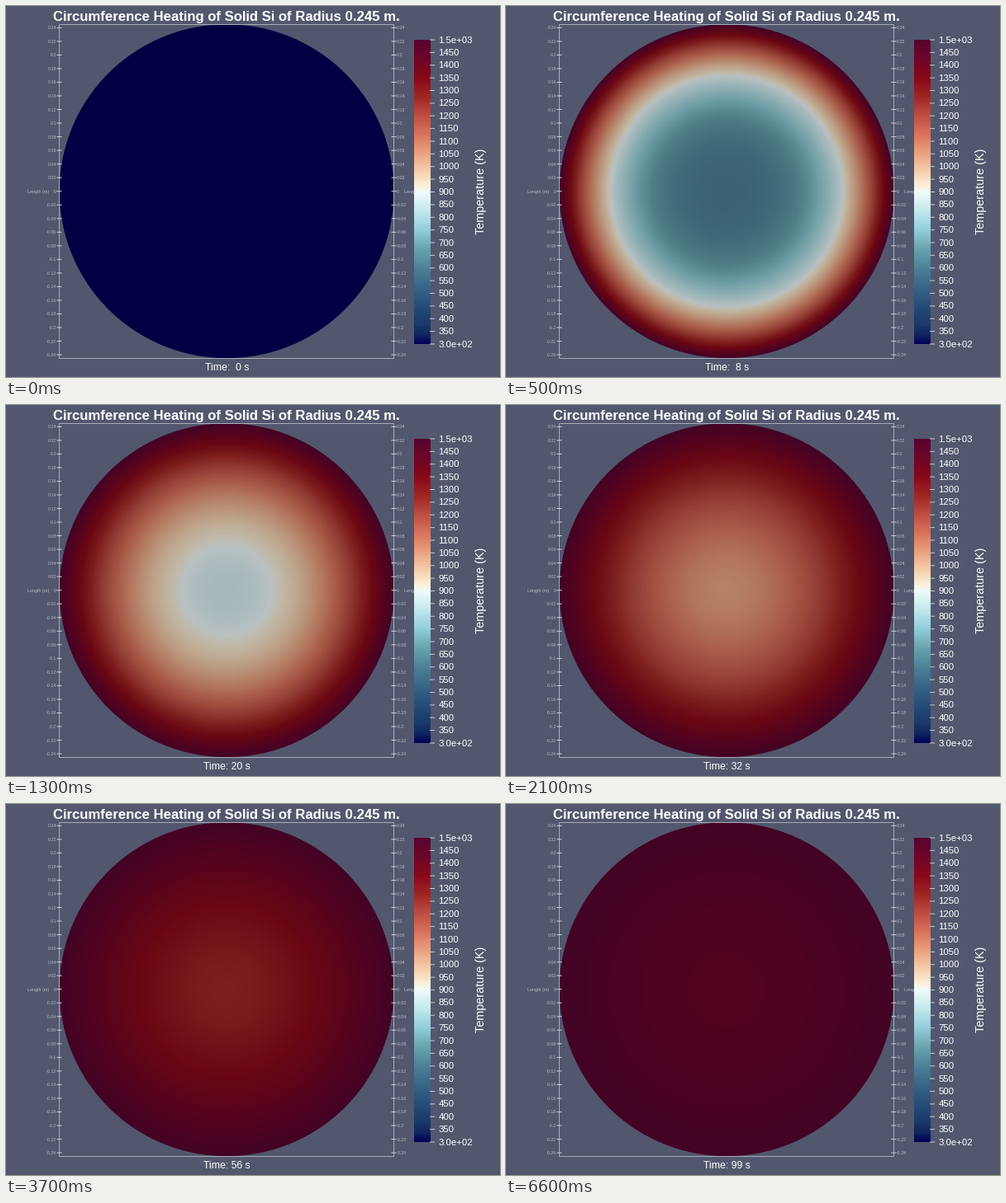
Animation of 598 by 450 pixels, one loop 6.7 s. Source, as a matplotlib script:

```python
import numpy as np
import matplotlib.pyplot as plt
from matplotlib.animation import FuncAnimation
from matplotlib.colors import LinearSegmentedColormap, to_rgb
from matplotlib.patches import Circle, Rectangle

W, H, DPI = 598, 450, 100
FRAMES, INTERVAL = 67, 100
STEP = 1.5                         # simulated seconds per frame
T_COLD, T_HOT = 300, 1500
CX, CY, R = 267.2, 224.7, 202.5    # disk, in pixels
SCALE = R / 0.245                  # pixels per metre
SHADE = 0.77                       # lighting on the disk surface

STOPS = [
    (0, "#000057"), (.03, "#11265f"), (.0625, "#1a3868"), (.125, "#264d78"),
    (.1875, "#386688"), (.25, "#4d8298"), (.3125, "#69a4ad"), (.375, "#92ced9"),
    (.4375, "#c2e8ee"), (.5, "#f0fafb"), (.52, "#fbf0da"), (.5625, "#f6d4b3"),
    (.625, "#eba482"), (.6875, "#db755d"), (.75, "#bf4f44"), (.8125, "#a12626"),
    (.875, "#890918"), (.9375, "#6f0428"), (1, "#560531"),
]


def heat_map(gain):
    stops = [(p, tuple(gain * c for c in to_rgb(h))) for p, h in STOPS]
    return LinearSegmentedColormap.from_list("heat", stops, N=1024)


def temperature(r, t):
    """Radial profile of a disk whose rim is held at T_HOT."""
    if t == 0:
        return np.full_like(r, T_COLD)
    core = np.exp(-0.0285 * t - 0.07 * (1 - np.exp(-(t / 4) ** 2)))
    power = 1.22 + 8.4 / t ** 0.78
    return T_HOT - (T_HOT - T_COLD) * core * (1 - r ** power)


plt.rcParams["font.family"] = "Liberation Sans"
fig = plt.figure(figsize=(W / DPI, H / DPI), dpi=DPI, facecolor="#52576e")
ax = fig.add_axes([0, 0, 1, 1])
ax.axis("off")


def label(x, y, s, px, color="white", **kw):
    kw.setdefault("va", "center_baseline")
    return ax.text(x, y, s, fontsize=px * 72 / DPI, color=color, **kw)


def line(xs, ys, color, px=1, **kw):
    ax.plot(xs, ys, color=color, lw=px * 72 / DPI, solid_capstyle="butt",
            snap=False, **kw)


# Disk
x0, y0, n = 64, 22, 406
yy, xx = np.mgrid[0:n, 0:n] + 0.5
radius = np.clip(np.hypot(xx + x0 - CX, yy + y0 - CY) / R, 0, 1)
disk = ax.imshow(temperature(radius, 0), cmap=heat_map(SHADE),
                 vmin=T_COLD, vmax=T_HOT, interpolation="nearest",
                 extent=(x0, x0 + n, y0 + n, y0), aspect="auto", zorder=2)
disk.set_clip_path(Circle((CX, CY), R, transform=ax.transData))

# Frame with length ticks on both sides
LEFT, RIGHT, TOP, BOTTOM = 64.5, 469.5, 22.5, 427.5
ax.add_patch(Rectangle((LEFT, TOP), RIGHT - LEFT, BOTTOM - TOP, fill=False,
                       ec="#a9abb7", lw=0.72, snap=False, zorder=3))
DIM = "#b9bbc5"
for k in range(-12, 13):
    y = CY - 0.02 * k * SCALE
    text = f"{0.02 * k:g}"
    for x in (LEFT, RIGHT):
        line([x - 3, x + 3], [y, y], "#d0d2d9", zorder=4)
    label(61, y, text, 5.2, DIM, ha="right")
    label(473, y, text, 5.2, DIM, ha="left")
label(26, CY, "Length (m)", 5.4, DIM)
label(482.5, CY, "Length (m)", 5.4, DIM).set_clip_path(
    Rectangle((470, 200), 24, 50, transform=ax.transData))

# Colour bar
B0, B1, BT, BB = 494, 514, 41, 410
ax.imshow(np.linspace(T_HOT, T_COLD, BB - BT)[:, None], cmap=heat_map(1),
          vmin=T_COLD, vmax=T_HOT, interpolation="nearest",
          extent=(B0, B1, BB, BT), aspect="auto", zorder=5)
for temp in range(T_COLD, T_HOT + 1, 50):
    y = BB - (temp - T_COLD) / (T_HOT - T_COLD) * (BB - BT)
    end = temp in (T_COLD, T_HOT)
    line([B1 - 1, B1 + 5], [y, y], "#c6c9d2", zorder=6)
    label(523.5, y - 0.4, f"{temp:.1e}" if end else str(temp), 11.4)
label(574.8, 225, "Temperature (K)", 14.4, rotation=90, ha="center",
      va="center")

label(266.8, 18, "Circumference Heating of Solid Si of Radius 0.245 m.", 16.7,
      weight="bold", ha="center", va="baseline")
clock = label(267.5, 442, "", 12.3, ha="center", va="baseline")

ax.set_xlim(0, W)
ax.set_ylim(H, 0)


def update(i):
    t = STEP * i
    disk.set_data(temperature(radius, t))
    clock.set_text(f"Time:{t:3.0f} s")
    return disk, clock


anim = FuncAnimation(fig, update, frames=FRAMES, interval=INTERVAL,
                     repeat=True, repeat_delay=0)
plt.show()
```
